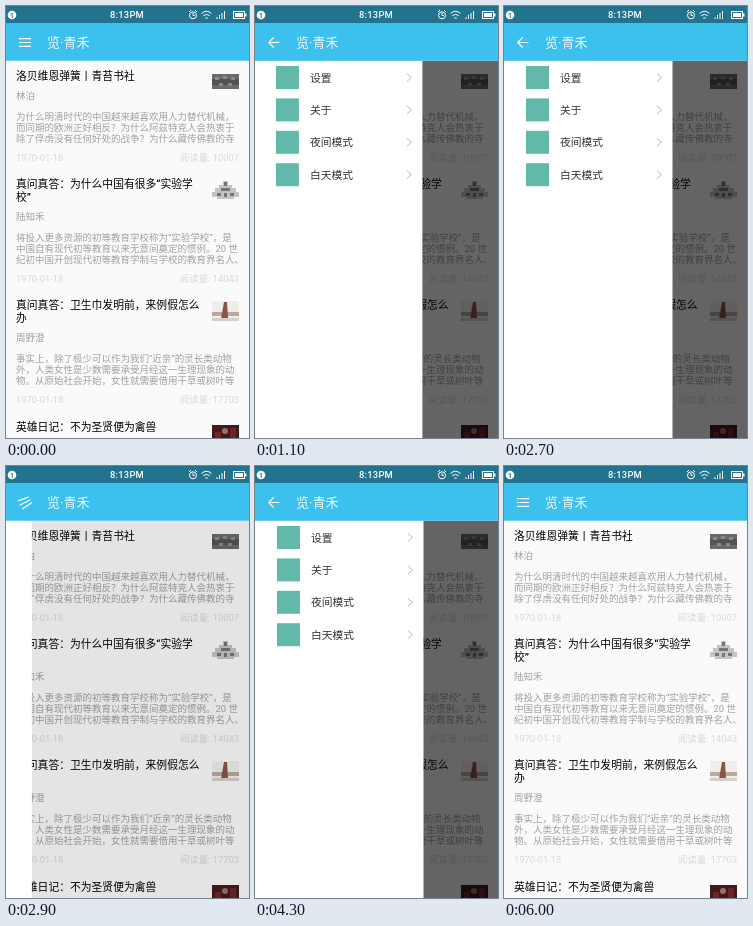
Write an HTML page that moves like this. It is 243 px wide and 432 px high and loops after 6.1 s.

```html
<!DOCTYPE html>
<html lang="zh-CN">
<head>
<meta charset="utf-8">
<title>抽屉菜单</title>
<style>
html, body { margin: 0; width: 100%; height: 100%; overflow: hidden; background: #fafafa; }
svg { display: block; width: 100vw; height: 100vh; }
text { font-family: Roboto, "Noto Sans CJK SC", "Noto Sans CJK", sans-serif; white-space: pre; }
.title { font-size: 10.8px; font-weight: 500; fill: #000; }
.body { font-size: 9.5px; fill: #a0a0a0; }
.meta { font-size: 9.4px; fill: #d9d9d9; }
.menu { font-size: 10.75px; fill: #333; }
.line { fill: none; stroke: #fff; stroke-width: 1.2; }
.thin { stroke-width: 1; }
</style>
</head>
<body>
<svg id="stage" viewBox="0 0 243 432">
  <rect width="243" height="432" fill="#fafafa"/>
  <g id="list"></g>
  <g id="thumbs">
    <g transform="translate(206 68)">
      <rect width="27" height="15" fill="#6b6a67"/>
      <rect y="5" width="27" height="6" fill="#555351"/>
      <path d="M3 3h4v3H3zM11 2h4v3h-4zM19 3h4v3h-4zM7 9h4v3H7zM16 9h4v3h-4z" fill="#8d8b88"/>
    </g>
    <g transform="translate(206 173)">
      <path d="M11 2h5v4h4v3h4v4h3v5h-5v2H5v-2H0v-5h3V9h4V6h4z" fill="#c2c4c5"/>
      <path d="M12 3h3v4h-3zM9 9h9v3H9zM5 14h4v3H5zM12 14h3v4h-3zM18 14h4v3h-4z" fill="#70767a"/>
    </g>
    <g transform="translate(206 295)">
      <rect width="27" height="20" fill="#f0eeec"/>
      <rect y="11" width="27" height="4" fill="#b9aaa0"/>
      <path d="M12 1h3l1 16-7 1z" fill="#8a5348"/>
      <rect y="17" width="27" height="3" fill="#d5cfca"/>
    </g>
    <g transform="translate(206 419)">
      <rect width="27" height="13" fill="#43191b"/>
      <circle cx="13" cy="6" r="3" fill="#98716a"/>
      <path d="M3 7h6v6H3zM18 3h6v10h-6z" fill="#6f2527"/>
    </g>
  </g>
  <rect id="scrim" y="54.7" width="243" height="377.3"/>
  <g id="drawer">
    <rect y="54.7" width="168.5" height="377.3" fill="#fff"/>
    <g id="items"></g>
  </g>
  <rect width="243" height="18" fill="#23738f"/>
  <rect y="17" width="243" height="37.7" fill="#3cc0ee"/>
  <circle cx="6" cy="9" r="4.3" fill="#fff"/>
  <text x="6" y="11.6" font-size="7" font-weight="700" text-anchor="middle" fill="#23738f">1</text>
  <text x="121" y="12.3" font-size="9.4" font-weight="500" letter-spacing=".25" text-anchor="middle" fill="#fff">8:13PM</text>
  <g class="line thin">
    <circle cx="187" cy="9.3" r="3.5"/>
    <path d="M187 7v2.5h1.8M183 6l2-2M191 6l-2-2"/>
    <path d="M195.5 7.5Q200.5 3 205.5 7.5M197.3 9.7Q200.5 7 203.7 9.7M199.3 12h2.4"/>
    <path d="M211 13v-2M213.5 13V9M216 13V7M218.5 13V5"/>
    <rect x="227.5" y="5.5" width="11" height="7"/>
  </g>
  <path d="M229 7h8v4h-8zM239 7.5h1.5v3H239z" fill="#fff"/>
  <path id="burger" class="line"/>
  <text x="41" y="41.3" font-size="13" fill="#f2fbff">览·青禾</text>
</svg>
<script>
const $ = id => document.getElementById(id);

function add(parent, tag, attrs, text = '') {
  const el = document.createElementNS('http://www.w3.org/2000/svg', tag);
  for (const key in attrs) el.setAttribute(key, attrs[key]);
  el.textContent = text;
  return parent.appendChild(el);
}

const label = (cls, x, y, text, anchor = 'start') =>
  add($('list'), 'text', { class: cls, x, y, 'text-anchor': anchor }, text);

const posts = [
  { y: 70, title: ['洛贝维恩弹簧丨青苔书社'], author: '林泊', views: 10007, body: [
    '为什么明清时代的中国越来越喜欢用人力替代机械，',
    '而同期的欧洲正好相反？为什么阿兹特克人会热衷于',
    '除了俘虏没有任何好处的战争？为什么藏传佛教的寺'] },
  { y: 178, title: ['真问真答：为什么中国有很多“实验学', '校”'], author: '陆知禾', views: 14043, body: [
    '将投入更多资源的初等教育学校称为“实验学校”，是',
    '中国自有现代初等教育以来无意间奠定的惯例。20 世',
    '纪初中国开创现代初等教育学制与学校的教育界名人、'] },
  { y: 299, title: ['真问真答：卫生巾发明前，来例假怎么', '办'], author: '周野澄', views: 17703, body: [
    '事实上，除了极少可以作为我们“近亲”的灵长类动物',
    '外，人类女性是少数需要承受月经这一生理现象的动',
    '物。从原始社会开始，女性就需要借用干草或树叶等'] },
  { y: 421, title: ['英雄日记：不为圣贤便为禽兽'], body: [] }
];

for (const { y, title, author, views, body } of posts) {
  title.forEach((s, i) => label('title', 10, y + 4 + i * 13, s));
  if (!author) continue;
  const top = y + (title.length - 1) * 13;
  label('body', 10, top + 23.4, author);
  body.forEach((s, i) => label('body', 10, top + 43.6 + i * 11.2, s));
  label('meta', 10, top + 85, '1970-01-18');
  label('meta', 233, top + 85, '阅读量: ' + views, 'end');
}

const items = ['设置', '关于', '夜间模式', '白天模式'].map((name, i) => {
  const y = 71.5 + i * 32.4;
  const row = add($('items'), 'g', {});
  add(row, 'rect', { x: 22, y: y - 11.5, width: 23, height: 23, fill: '#62b9aa' });
  add(row, 'text', { class: 'menu', x: 56, y: y + 4 }, name);
  add(row, 'path', { d: `M153 ${y - 4}l4.5 4-4.5 4`, fill: 'none', stroke: '#b8b8b8' });
  return row;
});

const LOOP = 6100, WIDTH = 168.5, SLIDE = 512;
const ROW_TIME = 250, ROW_DELAY = 75;
// each slide: start, opening or closing, start of the row entrance
const slides = [
  { at: 776, open: true, rows: 1155 },
  { at: 2741, open: false },
  { at: 3405, open: true, rows: 3788 },
  { at: 5441, open: false }
];

const clamp = v => Math.min(1, Math.max(0, v));
const mix = (a, b, p) => a + (b - a) * p;

function drawBurger(p, opening) {
  const angle = mix(0, Math.PI / 4, p);
  const size = mix(12.15, 7.2, p);
  const shaft = mix(12.15, 10.8, p);
  const gap = mix(3.8, 0, p);
  const dx = size * Math.cos(angle), dy = size * Math.sin(angle);
  const x = -shaft / 2;
  $('burger').setAttribute('d',
    `M${x} 0h${shaft}M${x} ${gap}l${dx} ${dy}M${x} ${-gap}l${dx} ${-dy}`);
  const turn = (opening ? 1 : -1) * mix(-180, 0, p);
  $('burger').setAttribute('transform', `translate(19 36.5) rotate(${turn})`);
}

function render(t) {
  const slide = slides.filter(s => s.at <= t).pop();
  const left = slide ? (1 - clamp((t - slide.at) / SLIDE)) ** 5 : 0;
  const opening = !slide || slide.open;
  const p = !slide ? 0 : opening ? 1 - left : left;

  $('drawer').setAttribute('transform', `translate(${(p - 1) * WIDTH} 0)`);
  $('scrim').setAttribute('opacity', 0.6 * p);
  drawBurger(p, opening);

  // rows are already in place during the first opening only
  const entering = slide && slide.open && t >= slide.rows;
  const shown = entering || slide === slides[0];
  $('items').setAttribute('visibility', shown ? 'visible' : 'hidden');
  items.forEach((row, i) => {
    const k = entering ? clamp((t - slide.rows - i * ROW_DELAY) / ROW_TIME) : 1;
    const x = -WIDTH * (1 + Math.cos(Math.PI * k)) / 2;
    row.setAttribute('transform', `translate(${x} 0)`);
  });
}

const start = performance.now();
function tick(now) {
  render(Math.max(0, now - start) % LOOP);
  requestAnimationFrame(tick);
}
render(0);
requestAnimationFrame(tick);
</script>
</body>
</html>
```
